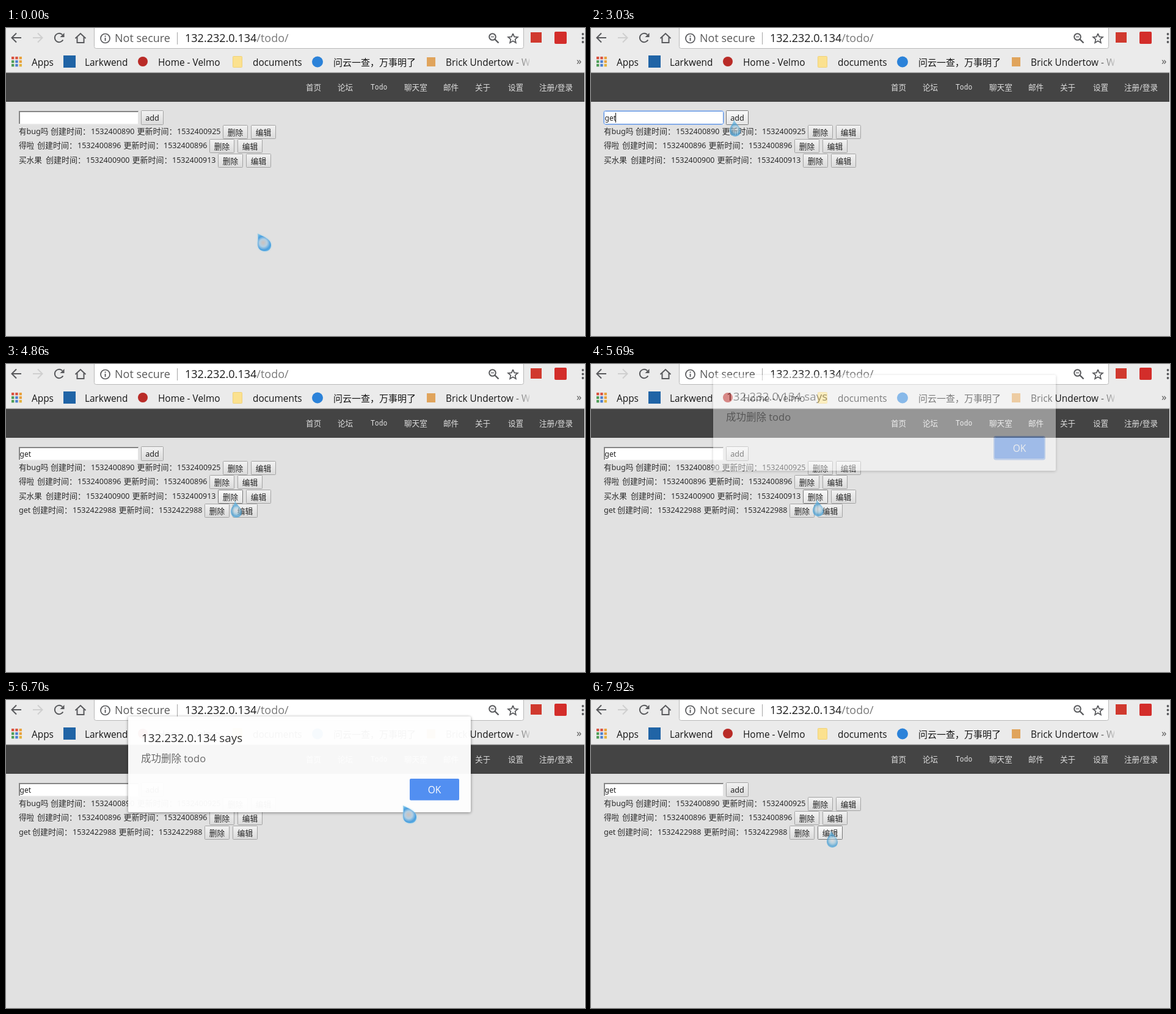
Animation, 948 px wide and 505 px high, one loop 8000 ms. Source, as an HTML page with a canvas:

```html
<!DOCTYPE html>
<html lang="zh">
<head>
<meta charset="utf-8">
<title>Todo</title>
<style>
html, body { margin: 0; width: 100%; height: 100%; overflow: hidden; background: #e1e1e1; }
canvas { display: block; }
</style>
</head>
<body>
<canvas id="stage" width="948" height="505"></canvas>
<script>
const stage = document.getElementById('stage');
const page = stage.getContext('2d');
const layer = new OffscreenCanvas(948, 505);
const overlay = layer.getContext('2d');
let ctx = page;

const LOOP = 8000;
const UI = '"Open Sans", "Noto Sans CJK SC", "Noto Sans CJK", sans-serif';
const PAGE = '"Noto Sans", "Noto Sans CJK SC", "Noto Sans CJK", sans-serif';
const MONO = '"DejaVu Sans Mono", monospace';

// time, pointer x, pointer y
const PATH = [
  [0, 412, 337], [200, 330, 268], [400, 205, 182], [600, 142, 142],
  [2630, 165, 144], [2830, 210, 146], [3030, 234, 150], [3450, 238, 190],
  [3650, 257, 256], [3850, 290, 284], [4050, 332, 278], [4250, 360, 260],
  [4450, 372, 238], [4660, 375, 227], [4860, 375, 224], [5260, 372, 223],
  [5480, 370, 222], [5880, 455, 212], [6080, 600, 178], [6300, 686, 150],
  [6500, 694, 148], [6700, 650, 173], [6900, 540, 200], [7100, 440, 213],
  [7300, 398, 217], [7500, 395, 215], [7710, 394, 214], [7920, 393, 214]
];
const TYPED = [[0, ''], [1200, 'g'], [1400, 'ge'], [1620, 'get']];
// time, opacity, vertical offset
const DIALOG = [[0, 0, 0], [5690, .44, -9], [5880, 1, 0], [6700, .96, 0], [6900, 0, 0]];
// label, first column, created, updated
const TODOS = [
  ['有bug吗', 73, 1532400890, 1532400925],
  ['得啦', 51, 1532400896, 1532400896],
  ['买水果', 65, 1532400900, 1532400913],
  ['get', 43, 1532422988, 1532422988]
];
const NAV = [['首页', 491], ['论坛', 543], ['Todo', 597], ['聊天室', 652],
  ['邮件', 716], ['关于', 768], ['设置', 822], ['注册/登录', 873]];
const MARKS = [['Apps', 42], ['Larkwend', 129], ['Home - Velmo', 249], ['documents', 404]];

const at = (steps, t) => steps.filter(s => s[0] <= t).pop();
const inside = (p, x, y, w, h) => p.x >= x && p.x < x + w && p.y >= y && p.y < y + h;

function rect(x, y, w, h, color) {
  ctx.fillStyle = color;
  ctx.fillRect(x, y, w, h);
}
function box(x, y, w, h, r, fill, border) {
  ctx.beginPath();
  ctx.roundRect(x, y, w, h, r);
  if (fill) { ctx.fillStyle = fill; ctx.fill(); }
  if (border) { ctx.strokeStyle = border; ctx.stroke(); }
}
function disc(x, y, r, color) {
  ctx.fillStyle = color;
  ctx.beginPath();
  ctx.arc(x, y, r, 0, 7);
  ctx.fill();
}
function line(points, color, width = 2) {
  ctx.strokeStyle = color;
  ctx.lineWidth = width;
  ctx.beginPath();
  points.forEach(([x, y]) => ctx.lineTo(x, y));
  ctx.stroke();
  ctx.lineWidth = 1;
}
function ring(x, y, r, color, from = 0, to = 7, width = 2) {
  ctx.strokeStyle = color;
  ctx.lineWidth = width;
  ctx.beginPath();
  ctx.arc(x, y, r, from, to);
  ctx.stroke();
  ctx.lineWidth = 1;
}
function text(str, x, y, size, color, family = PAGE, align = 'left') {
  ctx.font = size + 'px ' + family;
  ctx.fillStyle = color;
  ctx.textAlign = align;
  ctx.fillText(str, x, y);
}

function toolbar() {
  const ink = '#58595c';
  rect(0, 0, 948, 73, '#ebebeb');
  rect(0, 72.5, 948, 1, '#b5b5b5');
  box(144.5, -6.5, 703, 40, 3, '#fff', '#b9b9b9');

  line([[25, 16], [9, 16]], ink);
  line([[17, 8.5], [9.5, 16], [17, 23.5]], ink);
  line([[44, 16], [60, 16]], '#cfcfcf');
  line([[52, 8.5], [59.5, 16], [52, 23.5]], '#cfcfcf');
  ring(87, 16, 7.2, ink, .5, 5.5);
  ctx.fillStyle = ink;
  ctx.beginPath();
  ctx.moveTo(95.5, 8);
  ctx.lineTo(95.5, 15);
  ctx.lineTo(88.5, 15);
  ctx.fill();
  line([[113.5, 17], [122, 9], [130.5, 17]], ink);
  line([[116.5, 15], [116.5, 24], [127.5, 24], [127.5, 15]], ink);

  ring(162.5, 17, 7.5, ink, 0, 7, 1.7);
  rect(161.6, 16, 1.9, 5, ink);
  rect(161.6, 12.5, 1.9, 2, ink);
  text('Not secure', 178, 23, 18, '#5a5a5a', UI);
  rect(280, 7, 1, 20, '#a5a5a5');
  text('132.232.0.134', 293, 23, 18, '#1c1c1c', UI);
  text('/todo/', 293 + ctx.measureText('132.232.0.134').width, 23, 18, '#787878', UI);

  ring(796.5, 14.5, 5.3, ink);
  line([[800.5, 18.5], [806.5, 24.5]], ink, 2.4);
  line([[794, 14.5], [799, 14.5]], ink, 1.3);
  const star = [];
  for (let i = 0; i <= 10; i++) {
    const a = i * Math.PI / 5 - Math.PI / 2, r = i % 2 ? 3.8 : 8.3;
    star.push([830 + r * Math.cos(a), 17.5 + r * Math.sin(a)]);
  }
  line(star, ink, 1.7);
  rect(859, 7, 18, 17, '#d0392e');
  box(898, 6, 20, 20, 2, '#d32d2a');
  [10, 16.5, 23].forEach(y => disc(944.5, y, 1.9, ink));
}

function bookmarks() {
  const dots = ['#d9523f', '#d9523f', '#e9a13b', '#4f9d57', '#4a7fd0', '#e9a13b', '#4f9d57', '#4a7fd0', '#e3b23c'];
  dots.forEach((c, i) => rect(9 + i % 3 * 6.3, 47 + Math.floor(i / 3) * 6, 4.3, 4.3, c));
  rect(94, 45, 20, 20, '#2064a6');
  disc(224, 55, 8, '#b92b27');
  box(371.5, 46.5, 15, 18, 1, '#fbe18f', '#f0d27a');
  disc(510, 55.5, 9, '#2b82d9');
  rect(689, 48, 14, 15, '#e0a45c');
  MARKS.forEach(([label, x]) => text(label, x, 62, 15.4, '#151515', UI));
  text('问云一查，万事明了', 536, 62, 15, '#151515', UI);
  const fade = ctx.createLinearGradient(825, 0, 858, 0);
  fade.addColorStop(0, '#151515');
  fade.addColorStop(1, 'rgba(21,21,21,.15)');
  ctx.save();
  ctx.beginPath();
  ctx.rect(715, 42, 142, 28);
  ctx.clip();
  text('Brick Undertow - W', 720, 62, 15.4, fade, UI);
  ctx.restore();
  text('»', 934, 60, 17, '#555', UI);
}

function nav() {
  rect(0, 73.5, 947, 47.5, '#444');
  NAV.forEach(([label, x]) => label === 'Todo'
    ? text(label, x, 101, 11.4, '#dedede', MONO)
    : text(label, x, 101.5, 12.6, '#dedede'));
}

function button(label, x, y, w, h, pointer) {
  const hot = inside(pointer, x, y, w, h);
  const g = ctx.createLinearGradient(0, y, 0, y + h);
  g.addColorStop(0, hot ? '#fafafa' : '#f3f3f3');
  g.addColorStop(1, hot ? '#e4e4e4' : '#dadada');
  box(x + .5, y + .5, w - 1, h - 1, 1, g, hot ? '#777' : '#a3a3a3');
  text(label, x + w / 2, y + h / 2 + 5, 12.7, '#222', PAGE, 'center');
  return hot;
}

function field(value, focus, caret) {
  rect(21, 136, 197, 23, '#fff');
  if (focus) {
    box(21.5, 136.5, 195, 21, 2, null, '#5f93e0');
    box(20.5, 135.5, 197, 23, 3, null, '#a3c0ee');
  } else {
    rect(21, 136, 196, 2, '#858585');
    rect(21, 136, 2, 22, '#858585');
    rect(21, 157, 197, 2, '#e8e8e8');
    rect(216, 137, 2, 21, '#e2e2e2');
  }
  text(value, 22.5, 152, 12, '#222');
  if (caret) rect([23, 28, 35, 40][value.length], 139, 1, 16, '#111');
}

function todo([label, x, made, changed], i, pointer) {
  const top = Math.floor(159 + i * 23.6), y = top + 15;
  const ink = '#2b2b2b';
  text(label, 21, y, 12.6, ink);
  text('创建时间：', x, y, 13, ink);
  text(made, x + 66, y, 12.5, ink);
  text('更新时间：', x + 141.5, y, 13, ink);
  text(changed, x + 207, y, 12.5, ink);
  const del = button('删除', x + 282, top, 41, 23, pointer);
  const edit = button('编辑', x + 328, top, 41, 23, pointer);
  return del || edit;
}

function dialogPanel(focused) {
  ctx.clearRect(0, 0, 948, 505);
  ctx.save();
  ctx.shadowColor = 'rgba(0,0,0,.45)';
  ctx.shadowBlur = 5;
  ctx.shadowOffsetY = 1;
  box(200, 27, 561, 157, 2, '#fff');
  ctx.shadowColor = 'transparent';
  text('132.232.0.134 says', 222, 69, 18.8, '#282828', UI);
  text('成功删除 todo', 221, 102, 16.5, '#6c6c6c', UI);
  box(661, 129, 81, 35.5, 2, '#4d8cf2');
  if (focused) {
    ctx.lineWidth = 2;
    box(660, 128, 83, 37.5, 3, null, '#8fb4f3');
  }
  text('OK', 701.5, 153, 15.5, '#fff', UI, 'center');
  ctx.restore();
}

// Composed apart so that the panel fades as one piece.
function dialog(alpha, dy, focused) {
  if (!alpha) return;
  ctx = overlay;
  dialogPanel(focused);
  ctx = page;
  ctx.globalAlpha = alpha;
  ctx.drawImage(layer, 0, dy);
  ctx.globalAlpha = 1;
}

function drop(pointer, shape) {
  ctx.save();
  ctx.translate(pointer.x, pointer.y);
  ctx.beginPath();
  ctx.moveTo(0, 0);
  if (shape === 'text') {
    const g = ctx.createLinearGradient(0, 0, 8, 0);
    g.addColorStop(0, 'rgba(70,145,200,.85)');
    g.addColorStop(1, 'rgba(150,195,225,.2)');
    ctx.bezierCurveTo(3, 4, 4, 12, 8, 22);
    ctx.lineTo(2, 22);
    ctx.bezierCurveTo(-1, 14, 1, 7, 0, 0);
    ctx.fillStyle = g;
    ctx.fill();
  } else {
    const hand = shape === 'hand', cx = hand ? 2 : 9, cy = hand ? 16 : 15;
    const g = ctx.createRadialGradient(cx, cy, 1, cx + 1, cy + 1, hand ? 13 : 17);
    g.addColorStop(0, hand ? 'rgba(200,208,216,.5)' : '#c9c3c2');
    g.addColorStop(.32, hand ? 'rgba(150,198,222,.6)' : '#b3cfe3');
    g.addColorStop(.65, hand ? 'rgba(65,155,210,.75)' : '#4a9fdf');
    g.addColorStop(1, 'rgba(105,185,228,.7)');
    if (hand) {
      ctx.bezierCurveTo(2, 7, 11, 11, 11, 19);
      ctx.bezierCurveTo(11, 31, -7, 31, -7, 18);
      ctx.bezierCurveTo(-7, 11, -1, 8, 0, 0);
    } else {
      ctx.bezierCurveTo(9, 5, 22, 9, 22, 19);
      ctx.bezierCurveTo(22, 26, 17, 29, 12, 29);
      ctx.bezierCurveTo(4, 29, 0, 24, 0, 16);
      ctx.bezierCurveTo(1, 10, 1, 5, 0, 0);
      ctx.shadowColor = 'rgba(130,205,240,.8)';
      ctx.shadowBlur = 3;
    }
    ctx.fillStyle = g;
    ctx.fill();
  }
  ctx.restore();
}

function draw(t) {
  const [, x, y] = at(PATH, t), pointer = { x, y };
  const focus = t >= 600 && t < 3240;
  const caret = focus && !(t >= 2230 && t < 2630);
  const [, alpha, dy] = at(DIALOG, t);

  rect(0, 0, 948, 505, '#e1e1e1');
  toolbar();
  bookmarks();
  nav();
  rect(947, 73, 1, 432, '#f6f6f6');
  field(at(TYPED, t)[1], focus, caret);

  let hot = button('add', 221, 135, 37, 24, pointer);
  TODOS.filter((_, i) => (i !== 3 || t >= 3240) && (i !== 2 || t < 6700))
    .forEach((item, i) => { hot = todo(item, i, pointer) || hot; });
  dialog(alpha, dy, t < 6300);

  const shape = alpha === 1 ? 'arrow' : hot ? 'hand'
    : inside(pointer, 21, 136, 197, 23) ? 'text' : 'arrow';
  drop(pointer, shape);
}

const start = performance.now();
function tick() {
  draw((performance.now() - start) % LOOP);
  requestAnimationFrame(tick);
}
tick();
</script>
</body>
</html>
```
